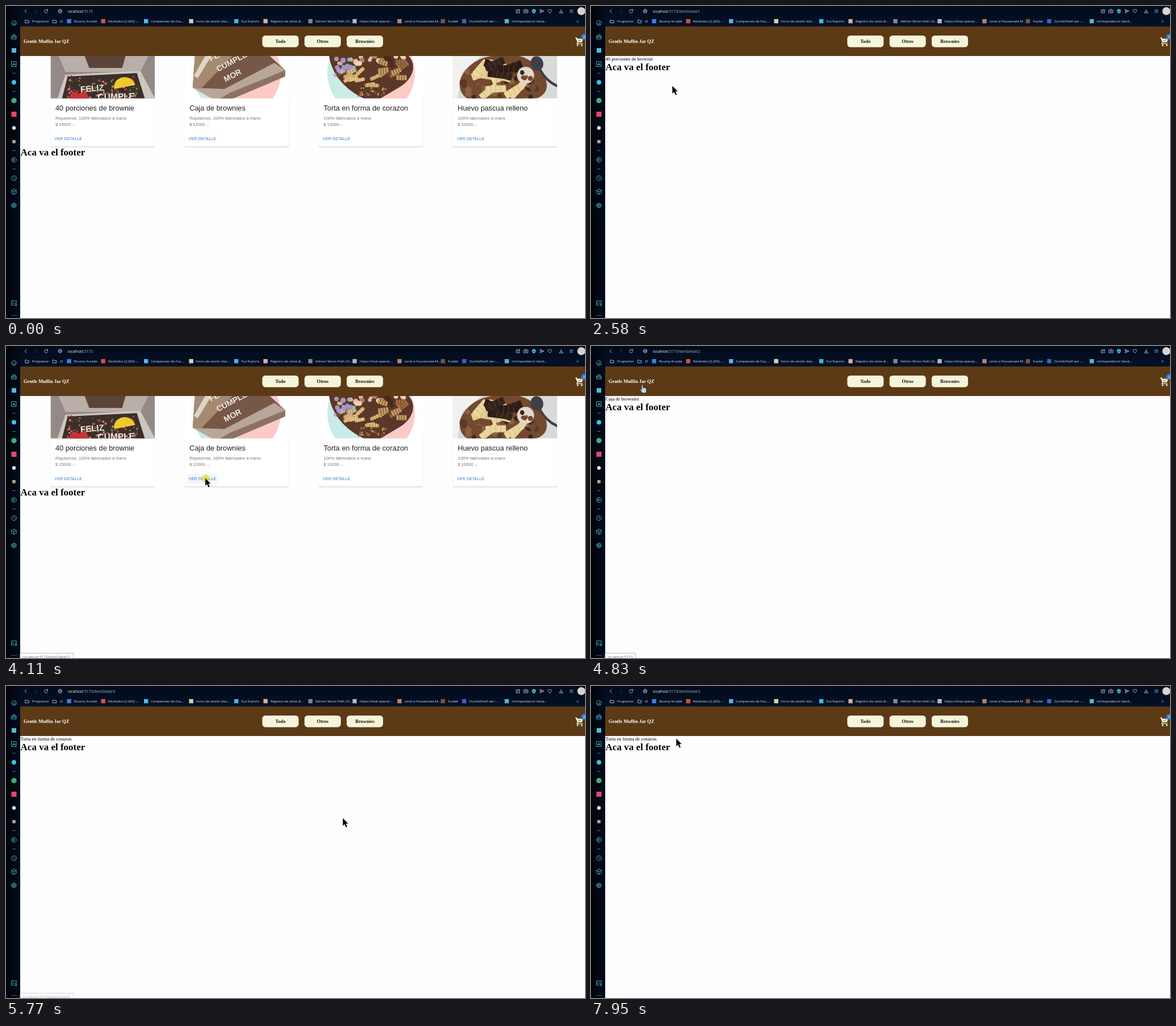
Recreate the animation shown at these times as an HTML page. Size 1020 by 549 pixels, loop 8000 ms.

```html
<!DOCTYPE html>
<html lang="es">
<head>
<meta charset="utf-8">
<title>Tienda</title>
<style>
html, body { margin: 0; width: 100%; height: 100%; overflow: hidden; background: #fefefe; }
svg { display: block; width: 1020px; height: 549px; }
text { white-space: pre; }
.ui { font-family: "Open Sans", "Noto Sans", sans-serif; }
.sans { font-family: "Liberation Sans", Arial, sans-serif; }
.serif { font-family: "Liberation Serif", "Times New Roman", serif; }
.line { fill: none; stroke-width: .9; stroke-linecap: round; stroke-linejoin: round; }
</style>
</head>
<body>
<svg id="stage" viewBox="0 0 1020 549" xmlns="http://www.w3.org/2000/svg"></svg>
<script>
const LOOP = 8000;
const CYAN = '#58b9d4', PALE = '#b9c9dc';

// ---------- drawing helpers ----------
const rect = (x, y, w, h, fill, more = '') => `<rect x="${x}" y="${y}" width="${w}" height="${h}" fill="${fill}" ${more}/>`;
const disc = (x, y, r, fill, more = '') => `<circle cx="${x}" cy="${y}" r="${r}" fill="${fill}" ${more}/>`;
const square = (r, fill) => rect(-r, -r, 2 * r, 2 * r, fill);
const shape = (d, fill, more = '') => `<path d="${d}" fill="${fill}" ${more}/>`;
const line = (d, color = CYAN, more = '') => `<path class="line" d="${d}" stroke="${color}" ${more}/>`;
const text = (x, y, size, str, cls, fill, more = '') =>
  `<text x="${x}" y="${y}" font-size="${size}" class="${cls}" fill="${fill}" ${more}>${str}</text>`;
const at = (x, y, body, turn = 0) => `<g transform="translate(${x} ${y}) rotate(${turn})">${body}</g>`;
const ring = r => `M${-r} 0a${r} ${r} 0 1 0 ${2 * r} 0a${r} ${r} 0 1 0 ${-2 * r} 0`;
const repeat = (n, fn) => Array.from({ length: n }, (_, i) => fn(i)).join('');

let seed = 7;
const rnd = () => (seed = seed * 16807 % 2147483647) / 2147483647;
const pick = list => list[Math.floor(rnd() * list.length)];
const spread = (n, [x, y, w, h], draw) =>
  repeat(n, () => at((x + rnd() * w).toFixed(1), (y + rnd() * h).toFixed(1), draw(), Math.round(rnd() * 70 - 50)));
const dots = (n, box, r, colors) => spread(n, box, () => disc(0, 0, (r * (.7 + rnd() * .6)).toFixed(1), pick(colors)));
const bars = (n, box, w, h, colors, groove) => spread(n, box, () =>
  rect(-w / 2, -h / 2, w, h, pick(colors), 'rx="1.5"') +
  [-1, 0, 1].map(k => line(`M${k * w / 4} ${-h / 2}v${h}`, groove)).join(''));

// ---------- browser frame ----------
function sidebar() {
  const icons = [
    line(ring(4.2) + 'M0 .5L1.8 -2M-2.4 1.8h4.8'),
    line('M-4 -1h8v5h-8zM-2 -1v-2.5h4v2.5M-4 1.2h8'),
    square(4, CYAN),
    line('M-4 -4.3h8v8.6h-8zM-2.3 2.2a2.3 2.3 0 0 1 4.6 0' + ring(1.2)),
    '-', disc(0, 0, 4, '#3cc4ea'), '-',
    disc(0, 0, 4.7, '#3fae7c'), square(4.5, '#e2486c'), disc(0, 0, 3.2, '#dfe9ec'), square(2.8, '#b9a68d'),
    '-', line(ring(4.3) + 'M-1.3 -2L2 0L-1.3 2z'), '-',
    line(ring(4.3) + 'M0 -2.5V.3L1.8 1.5'),
    line('M0 -4.6L4.2 -2.4V2.4L0 4.6L-4.2 2.4V-2.4L0 0L4.2 -2.4M0 0V4.6M-4.2 -2.4L0 -4.6'),
    line(ring(1.4) + ring(3.4)) + line(ring(4.3), CYAN, 'stroke-dasharray="1.2 2.18"')
  ];
  let y = 30, last = '';
  const column = icons.map(icon => {
    if (last) y += icon === '-' || last === '-' ? 16.05 : 24.07;
    last = icon;
    return at(14, y, icon === '-' ? line('M-2.500 0h5', '#4c8ba3') : icon);
  });
  return rect(0, 0, 25, 549, 'url(#side)') + column.join('') +
    at(14, 522.5, line('M4.3 1v-4.600h-8.600v7.400h5M-4 2l2.600 -2.800 2 2 1.300 -1.200 2 2M3.600 2v3.400M2 3.700h3.400')) +
    repeat(3, i => disc(10.6 + 3.4 * i, 544.5, .8, CYAN));
}

function toolbar() {
  const nav = [
    line('M1.2 -2.8L-1.8 0L1.2 2.8', PALE),
    line('M-1.2 -2.8L1.8 0L-1.2 2.8', '#35445c'),
    line('M2.6 -1.6A3 3 0 1 0 3 .8M3 -3.2v2h-2', PALE)
  ];
  const tools = [
    line('M0 -2.4h-3v5.4h5.6v-2.4M-1 1C-.8 -1 .6 -1.8 3 -1.8M1.6 -3.4L3.2 -1.8L1.6 -.2', PALE),
    line('M-3.4 -2h1.6l.8 -1.2h2l.8 1.2h1.6v5h-6.8z' + ring(1.2), PALE),
    shape('M0 -3.7L3.3 -2.5V.4Q3 2.8 0 4Q-3 2.8 -3.3 .4V-2.5z', '#3fc1d6') + line('M-1.4 0L-.3 1.2L1.6 -1.1', '#04152c'),
    line('M-3.2 -3L3.6 0L-3.2 3L-2 0zM-2 0h2.4', PALE),
    line('M0 3L-3 0C-4.4 -2 -1.6 -4.4 0 -1.8C1.6 -4.4 4.4 -2 3 0z', PALE)
  ];
  // text start, label, favicon colour (a folder when missing)
  const marks = [
    [46, 'Programar'], [94.5, ':D'],
    [120, 'Bounty Arcade', '#3f7fd8'], [180, 'Recibidos (2,265) -...', '#dd4b3f'],
    [255.5, 'Campeones de Fuz,...', '#55b3e8'], [335, 'Inicio de sesión diar...', '#d8cfae'],
    [414.5, 'Fuz Esports', '#48b4da'], [466, 'Registro de visita di...', '#dcaaa2'],
    [545, 'Velmor Moon Path Ch...', '#8b857f'], [623, 'https://chat.openai....', '#b4b8bd'],
    [702, 'Lend a Housemate M...', '#b88568'], [778.5, 'Fuzdel', '#77592f'],
    [816, 'OurInkShelf.net -...', '#3c62b4'], [891, 'mirlopandero\u2019s Vand...', '#56b5cb']
  ];
  const folder = line('M-3 -2h2.2l.8 1h3v4h-6z', PALE);
  return rect(25, 0, 995, 36, 'url(#bar)') +
    nav.map((icon, i) => at(35 + 17.75 * i, 9, icon)).join('') +
    at(95.5, 9, line(ring(3.3) + 'M-3.3 0h6.6M0 -3.3C-2 -1 -2 1 0 3.3C2 1 2 -1 0 -3.3', '#8fa9c4')) +
    tools.map((icon, i) => at(902 + 14 * i, 9, icon)).join('') +
    at(978, 9, line('M0 -3V1.4M-1.8 -.2L0 1.6L1.8 -.2M-3 1.8v1.4h6v-1.4', PALE)) +
    at(996, 9, line('M-2.8 -2.2h5.6M-2.8 0h5.6M-2.8 2.2h5.6')) +
    disc(1013.5, 9, 7, '#d4d6d4') +
    marks.map(([x, name, color]) =>
      at(x - 8.8, 26.7, color ? square(3.7, color) : folder) + text(x, 28.9, 5.95, name, 'ui', '#dae3ee')).join('') +
    text(1005, 29, 8, '»', 'ui', PALE) +
    text(109, 11.5, 6.5, '<tspan fill="#f2f6fb">localhost</tspan><tspan id="path"></tspan>', 'ui', '#a9b6c8');
}

function navbar() {
  const cream = '#f5f5dc', brown = '#5c3a15';
  return rect(25, 36, 995, 52, brown) +
    text(31, 65, 8.5, 'Gentle Muffin Jar QZ', 'serif', '#fff', 'font-weight="bold"') +
    ['Todo', 'Otros', 'Brownies'].map((name, i) => at(451.5 + 74.35 * i, 52,
      rect(0, 0, 64, 20.4, cream, 'rx="5.3"') +
      text(32, 13, 8.5, name, 'serif', '#15120c', 'font-weight="bold" text-anchor="middle"'))).join('') +
    shape('M1003 55.5h2.7l.8 2h10.5l-2.6 6.4h-6.6l-.9 1.8h8.9v1.4h-11l1.6 -3.6l-2.7 -6.6h-.7z', cream) +
    line('M1008.4 60.4l1.9 1.8l3.4 -3.6', brown) +
    disc(1007, 69, 1.5, cream) + disc(1014.3, 69, 1.5, cream) +
    disc(1018.5, 54.3, 5.3, '#1877e0') + text(1016.6, 56.7, 6.4, '0', 'sans', '#fff');
}

// ---------- product pictures, 183.5 x 74.4 each ----------
const halves = rect(0, 0, 184, 75, '#fff') + disc(92, 30, 77, '#cbebe6') + shape('M92 -47a77 77 0 0 1 0 154z', '#fdcac6');
const word = (x, y, size, str, turn) => at(x, y, text(0, 0, size, str, 'sans', '#eee9e2', 'font-weight="bold"'), turn);
const COCOA = ['#73492f', '#5c3825', '#8d603f', '#3c261d'];
const CREAM = ['#ead79f', '#e4cd94'];

const photos = [
  () => rect(0, 0, 184, 75, '#948985') + shape('M14 0H172L158 28H26z', '#b9aea8') + shape('M60 0H132L126 21H68z', '#5b4437') +
    shape('M26 33L158 26L184 75H12z', '#cdc7c2') + shape('M30 36L152 30L166 75H20z', '#3c2f29') +
    dots(110, [30, 36, 126, 38], 1.7, ['#b83a35', '#6b8b4e', '#8b5a3d', '#d77c78', '#57453b']) +
    shape('M112 58a17.5 16 0 0 1 37 -7z', '#f0c92d') +
    disc(43, 73, 9.5, '#cf3034') + disc(57, 72, 9, '#cf3034') +
    word(53, 64, 15, 'FELIZ', -5) + word(83, 77, 15.5, 'CUMPLE', -1),
  () => halves + shape('M18 0H150L177 25L82 75H62L14 56z', '#775746') + shape('M18 0H84L30 56H14z', '#a58a72') +
    shape('M36 0H47L23 39L16 35z', '#ded4c5') +
    shape('M14 56L70 58L158 12L177 25V35L82 75H48z', '#b8a698') + shape('M79 65L177 25V36L85 75H62z', '#8c7261') +
    ['FELIZ', 'CUMPLE', 'MOR'].map((str, i) => word(46 + 13 * i, 10 + 18 * i, 14, str, -28)).join(''),
  () => halves + shape('M18 0H158C174 16 166 42 140 56L108 75H80C56 64 24 40 18 0Z', '#5b3729') +
    dots(34, [28, 3, 34, 36], 4, ['#a991c0', '#c2a7ce', '#8cb4c4', '#dfbd75', '#6e4935']) +
    dots(22, [62, 0, 90, 18], 4, ['#e6b7b0', '#b57c5b', '#e9d6b0', '#472a20']) +
    bars(12, [52, 26, 56, 30], 18, 6, ['#d9b06d', '#c99d5e'], '#f2e2b6') +
    bars(9, [112, 10, 38, 34], 18, 9, ['#a06a45', '#71452f', '#c69c62'], '#5b3729') +
    dots(40, [70, 56, 50, 14], 1.6, ['#a87144', '#c79a5d', '#7c4b31']),
  () => rect(0, 0, 184, 75, '#d8dad8') + shape('M0 0H50L16 28L8 75H0z', '#f1f1ef') +
    shape('M12 44C20 18 46 2 70 0H116C150 6 190 60 146 75H26Q10 66 12 44Z', COCOA[0]) +
    dots(50, [18, 26, 132, 48], 5, COCOA) +
    bars(6, [44, 6, 44, 36], 32, 13, CREAM, '#c9b070') +
    bars(6, [62, 14, 52, 28], 36, 13, ['#34221c', '#2c1c18'], '#644236') +
    bars(4, [60, 56, 66, 8], 36, 12, CREAM, '#c9b070') +
    disc(128, 34, 15, '#e2d7cd') + dots(6, [118, 26, 20, 18], 4, COCOA) +
    at(148, 13, '<ellipse rx="11" ry="13" fill="#3f4046"/>', -18) +
    line('M154 25Q164 44 184 53', '#3f4046', 'style="stroke-width:4.5"')
];

// ---------- pages ----------
const items = [
  ['40 porciones de brownie', 'Riquisimos, 100% fabricados a mano', 15000],
  ['Caja de brownies', 'Riquisimos, 100% fabricados a mano', 12000],
  ['Torta en forma de corazon', '100% fabricados a mano', 13000],
  ['Huevo pascua relleno', '100% fabricados a mano', 10000]
];
const cardX = i => 78.6 + 236.25 * i;
const footer = y => text(25.6, y, 17, 'Aca va el footer', 'serif', '#000', 'font-weight="bold"');

function card([name, note, price], i) {
  const small = (y, str) => text(8.4, y, 7.44, str, 'sans', '#737373', 'letter-spacing=".08"');
  return at(cardX(i), 88,
    rect(0, -5, 183.5, 164.2, '#fff', 'rx="2.1" filter="url(#shadow)"') +
    `<g clip-path="url(#photo)">${photos[i]()}</g>` +
    text(8.4, 96, 12.75, name, 'sans', '#212121') +
    small(112.4, note) + small(123.2, `$ ${price} .-`) +
    rect(4, 137.4, 54, 16.4, '#1976d2', `id="hover${i + 1}" rx="2" opacity=".06"`) +
    text(7, 148.4, 6.9, 'VER DETALLE', 'sans', '#2d79c7', 'letter-spacing=".2"'));
}

const defs = `<defs>
  <linearGradient id="side"><stop offset="0" stop-color="#00030a"/><stop offset="1" stop-color="#020c1b"/></linearGradient>
  <linearGradient id="bar" x2="0" y2="1"><stop offset="0" stop-color="#020b1b"/><stop offset="1" stop-color="#041127"/></linearGradient>
  <clipPath id="photo"><rect width="183.5" height="74.4"/></clipPath>
  <clipPath id="below"><rect x="25" y="88" width="995" height="461"/></clipPath>
  <filter id="shadow" x="-5%" y="-5%" width="110%" height="110%"><feDropShadow dx="0" dy=".9" stdDeviation=".75" flood-opacity=".36"/></filter>
</defs>`;
const arrow = shape('M0 0V14.6L3.3 11.5L5.6 17L8.3 15.8L6 10.5H10.2Z', '#000', 'id="arrow" stroke="#fff" stroke-width=".6"');
const hand = shape('M-.9 .4Q.4 -.7 1.6 .6V5.2Q5 4.500 7.6 7.600V11.2L6.3 14.8H.6L-3.5 9.3Q-3.7 7.6 -2.2 7.9L-.9 9.2Z',
  '#bdd8f2', 'id="hand" stroke="#17243a" stroke-width=".8"');

document.getElementById('stage').innerHTML = defs + rect(0, 0, 1020, 549, '#fefefe') +
  `<g id="list" clip-path="url(#below)">${items.map(card).join('')}${footer(262.7)}</g>` +
  `<g id="detail">${text(25.6, 95.6, 8.5, '', 'serif', '#000', 'id="name"')}${footer(113.4)}</g>` +
  navbar() + toolbar() + sidebar() +
  `<g id="status">${rect(24.9, 540.6, 0, 12, '#fff', 'id="box" stroke="#a8a8a8" stroke-width=".8"')}` +
  `${text(29.8, 550.3, 6.5, '', 'ui', '#6b6b6b', 'id="link"')}</g>` +
  `<g id="mouse">${disc(1, 1.5, 7, '#e6dc2c', 'id="halo" opacity=".75"')}${arrow}${hand}</g>`;

// ---------- timeline ----------
const PRESS = 150;
const stop = (page, arrive, click, leave) => ({
  page, arrive, click, leave,
  x: page ? cardX(page - 1) + 24 + 6 * page : 90, y: page ? 232 : 68
});
// page 0 is the list, reached through the shop name
const stops = [
  stop(1, 1990, 2330, 2350), stop(0, 2860, 3200, 3400),
  stop(2, 3770, 4240, 4280), stop(0, 4700, 5010, 5020),
  stop(3, 5480, 5700, 5790), stop(0, 6270, 6440, 6590),
  stop(3, 7080, 7340, 7380)
];
// pointer tip: time, x, y
const path = [
  [70, 990, 541], [850, 766, 289], [1450, 133, 169], [1710, 133, 169], [2580, 143, 140], [7950, 150, 92],
  ...stops.flatMap(s => [[s.arrive, s.x, s.y], [s.leave, s.x, s.y]])
].sort((a, b) => a[0] - b[0]);

const $ = id => document.getElementById(id);
const show = (id, on) => $(id).style.display = on ? '' : 'none';
const route = n => ':5173' + (n ? '/itemDetail/' + n : '');

function tip(t) {
  const i = path.findIndex(k => k[0] > t);
  if (i < 1) return path.at(i).slice(1);
  const [t0, x0, y0] = path[i - 1], [t1, x1, y1] = path[i];
  const u = (t - t0) / (t1 - t0), e = u * u * (3 - 2 * u);
  return [x0 + (x1 - x0) * e, y0 + (y1 - y0) * e];
}

function draw(t) {
  const page = stops.reduce((now, s) => s.click <= t ? s.page : now, 0);
  show('list', !page);
  show('detail', page);
  $('path').textContent = route(page);
  $('name').textContent = page ? items[page - 1][0] : '';

  // link hint: fades in on arrival, out after leaving
  const hint = stops.find(s => t > s.arrive - 70 && t < s.leave + 70);
  show('status', hint);
  if (hint) {
    $('status').style.opacity = Math.min(1, (t - hint.arrive + 70) / 90, (hint.leave + 70 - t) / 150);
    $('box').setAttribute('width', hint.page ? 94 : 53.4);
    $('link').textContent = 'localhost' + route(hint.page);
  }
  items.forEach((_, i) => show('hover' + (i + 1), hint && hint.page === i + 1));

  const [x, y] = tip(t);
  const onHome = x > 31 && x < 114 && y > 56 && y < 74;
  show('mouse', t >= 70);
  $('mouse').setAttribute('transform', `translate(${x.toFixed(2)} ${y.toFixed(2)})`);
  show('arrow', !onHome);
  show('hand', onHome);
  show('halo', stops.some(s => t >= s.click - PRESS && t < s.click));
}

const start = performance.now();
function tick() {
  draw((performance.now() - start) % LOOP);
  requestAnimationFrame(tick);
}
draw(0);
requestAnimationFrame(tick);
</script>
</body>
</html>
```
